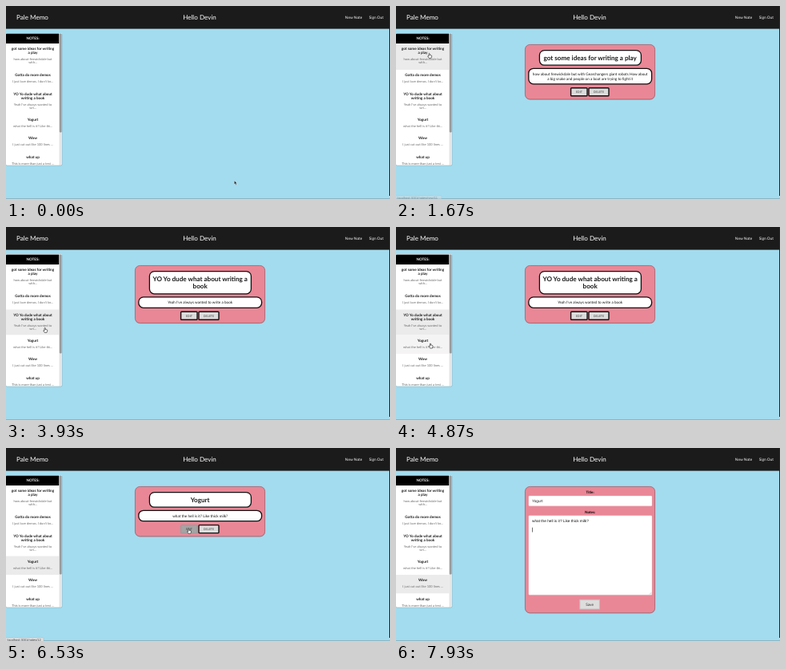
These frames come from a looping animation (480x242 px, 8000 ms). An HTML page:

```html
<!DOCTYPE html>
<html lang="en">
<head>
<meta charset="utf-8">
<title>Notes</title>
<style>
  html, body { margin: 0; width: 100%; height: 100%; overflow: hidden; background: #a3dcef; }
  svg { display: block; width: 100vw; height: 100vh; }
  text { font-family: Lato, "Open Sans", sans-serif; text-rendering: geometricPrecision; }
  .form-text { font-family: "Liberation Sans", Arial, sans-serif; }
</style>
</head>
<body>
<svg id="stage" viewBox="0 0 480 242"></svg>
<script>
const LOOP = 8000, FPS = 15;

const rect = (x, y, w, h, fill, more = "") =>
  `<rect x="${x}" y="${y}" width="${w}" height="${h}" fill="${fill}" ${more}/>`;
const text = (x, y, size, str, more = "") =>
  `<text x="${x}" y="${y}" font-size="${size}" ${more}>${str}</text>`;
const mid = (x, y, size, str, more = "") =>
  text(x, y, size, str, `text-anchor="middle" ${more}`);
const bold = 'font-weight="700"';
const group = (id, body, more = "") => `<g id="${id}" ${more}>${body}</g>`;

// Sidebar notes: top, height, title lines, preview lines
const notes = [
  [47, 33, ["got some ideas for writing", "a play"], ["how about fenwickdale but", "with..."]],
  [80, 23.5, ["Gotta do more demos"], ["I just love demos. I don't kn..."]],
  [103.5, 32, ["YO Yo dude what about", "writing a book"], ["Yeah I've always wanted to", "wri..."]],
  [135.5, 23.5, ["Yogurt"], ["what the hell is it? Like thi..."]],
  [159, 23.5, ["Wow"], ["I just cut out like 100 lines ..."]],
  [182.5, 23.5, ["what up"], ["This is more than just a test ..."]]
];

function noteItem([y, h, titles, previews], i) {
  const sub = y + 16.3 + (titles.length - 1) * 4.7;
  return rect(0, y, 66.5, h, "#fff", `id="item${i}"`) +
    titles.map((s, n) => mid(33.5, y + 8.4 + n * 4.6, 4.63, s, bold + ' fill="#1c1c1c"')).join("") +
    previews.map((s, n) => mid(33.5, sub + n * 4.1, 4.05, s, 'fill="#6c6c6c"')).join("");
}

const panel = h =>
  rect(161.4, 48.6, 162.4, h + .6, "#7d97a3", 'rx="6" opacity=".6"') +
  rect(161.4, 48.4, 162.2, h, "#e98796", 'rx="6" stroke="#a8606d" stroke-width=".8"');
const pill = (x, y, w, h) =>
  rect(x, y, w, h, "#fff", 'rx="6" stroke="#111" stroke-width="1.3"');

function button(x, y, w, label, edge, id = "") {
  return rect(x, y, w, 10, "#dcdcdc", `${id} rx=".8" stroke="${edge}" stroke-width="1.4"`) +
    mid(x + w / 2, y + 6.3, 3.75, label, 'fill="#444"');
}

// A card grows with its title and body line counts
function card(titles, lines, editEdge, id = "") {
  const th = 9 + titles.length * 9.6;
  const by = 55.6 + th + 4.1, bh = 7.3 + lines.length * 6.1;
  const y = by + bh + 4.9;
  return panel(y + 14.2 - 48.4) + pill(179.4, 55.6, 127, th) +
    titles.map((s, n) => mid(242.7, 67.7 + n * 9.6, 8.1, s, bold + ' fill="#1a1a1a"')).join("") +
    pill(165.8, by, 153.8, bh) +
    lines.map((s, n) => mid(242.7, by + 8.3 + n * 6.1, 4.65, s, 'fill="#111"')).join("") +
    button(218.6, y, 20.4, "EDIT", editEdge, id) + button(241, y, 25, "DELETE", "#111");
}

const cards = [
  card(["got some ideas for writing a play"],
    ["how about fenwickdale but with Gearchangers giant robots How about",
     "a big snake and people on a boat are trying to fight it"], "#111"),
  card(["Gotta do more demos"], ["I just love demos. I don't know the order"], "#111"),
  card(["YO Yo dude what about writing a", "book"], ["Yeah I've always wanted to write a book"], "#111"),
  card(["Yogurt"], ["what the hell is it? Like thick milk?"], "#c6c3c4", 'id="edit"')
];

const form = panel(158.4) +
  mid(242.6, 56.7, 4.5, "Title:", bold) +
  rect(165.8, 60, 154.2, 12.8, "#fff", 'rx="1" stroke="#d9c5c9" stroke-width=".4"') +
  text(170, 68.1, 4.73, "Yogurt", 'class="form-text" fill="#222"') +
  mid(242.6, 81.5, 4.5, "Notes:", bold) +
  rect(165.8, 84.8, 154.2, 99.4, "#fff", 'rx="1" stroke="#d9c5c9" stroke-width=".4"') +
  text(170, 92.9, 4.73, "what the hell is it? Like thick milk?", 'class="form-text" fill="#111"') +
  '<path d="M317 183.4l2.2-2.2M318.3 183.4l.9-.9" stroke="#888" stroke-width=".4"/>' +
  rect(229.8, 190.2, 24.6, 11.8, "#dedcdc", 'stroke="#c4bcbe" stroke-width="1"') +
  mid(242.1, 197.8, 4.8, "Save", 'fill="#333"') +
  rect(0, 0, .6, 5.8, "#111", 'id="caret"');

const arrow = '<path d="M0 0V4.6L1.1 3.7 1.9 5.4 2.7 5 1.9 3.4H3.3Z" fill="#111" stroke="#fff" stroke-width=".35"/>';
const hand = '<path d="M-.6.6Q0-.4.6.6V2.4L1.5 2.3 2.2 2.7 3 3V4.6L2.3 6.2H-.4L-2 3.9Q-2 3.1-.6 3.7Z" fill="#fff" stroke="#111" stroke-width=".6"/>';
const beam = '<path d="M-1-3Q0-3 0-2.4 0-3 1-3M0-2.4V2.4M-1 3Q0 3 0 2.4 0 3 1 3" fill="none" stroke="#222" stroke-width=".5"/>';

const stage = document.getElementById("stage");
stage.innerHTML =
  rect(0, 0, 480, 242, "#a3dcef") +
  rect(0, 0, 480, 28.6, "#1b1b1b") +
  rect(0, 241.2, 480, .8, "#87aab7") + rect(479, 0, 1, 238, "#1d282c") +
  text(13, 16.9, 8.1, "Pale Memo", 'fill="#fff"') +
  mid(242, 16.9, 8.1, "Hello Devin", 'fill="#fff"') +
  text(423.8, 15.6, 4.8, "New Note", 'fill="#fff"') +
  text(453.7, 15.6, 4.8, "Sign Out", 'fill="#fff"') +
  '<clipPath id="box"><rect y="34" width="70" height="165.6" rx="1.5"/></clipPath>' +
  rect(0, 34.2, 70.3, 166, "#7fa9b8", 'rx="1.5"') +
  group("list", rect(0, 34, 70, 166, "#fff") +
    notes.map(noteItem).join("") +
    rect(0, 34.6, 66.5, 12.4, "#000") +
    mid(33.5, 42.2, 4.6, "NOTES:", bold + ' fill="#fff"') +
    rect(66.5, 34, 3.5, 166, "#e6e6e6") + rect(66.8, 34.5, 2.9, 124, "#9b9b9b", 'rx="1"'),
    'clip-path="url(#box)"') +
  cards.map((c, i) => group("card" + i, c)).join("") +
  group("form", form) +
  group("status", rect(-1, 237.6, 58, 6, "#dcdfe1", 'id="bar" rx="1" stroke="#9fb4bd" stroke-width=".5"') +
    text(1.5, 241.8, 4, "", 'id="url" class="form-text" fill="#444"')) +
  group("cursor", group("arrow", arrow) + group("hand", hand) + group("beam", beam));

const $ = id => document.getElementById(id);
const show = (id, on) => { $(id).style.display = on ? "" : "none"; };

// Pointer path: tick, x, y
const path = [
  [2, 285.4, 219], [6, 251, 92.6], [9, 251, 92.6], [12, 115, 77.6], [14, 115, 77.6],
  [18, 40.6, 58.4], [20, 40.6, 58.4], [21, 41.6, 59.2], [27, 41.6, 59.2], [33, 32, 89],
  [43, 32, 89], [47, 30, 122.4], [55, 30, 122.4], [61, 58, 128], [67, 97, 146],
  [70, 97, 146], [73, 43, 145.8], [77, 34.4, 145], [85, 34.4, 145], [91, 120, 138],
  [98, 228.4, 101], [101, 228.4, 101], [108, 244, 91]
];
// Step tables: from tick, value
const scenes = [[0, -1], [25, 0], [37, 1], [50, 2], [79, 3], [99, 4]];
const links = [[0, ""], [25, "new/11"], [31, "new/10"], [45, "new/13"], [58, ""],
  [79, "new/12"], [88, ""], [96, "12"], [101, ""]];
const carets = [[0, null], [108, [241.2, 88.4]], [113, [170.2, 94]], [115, [170.2, 99.7]]];

const stepAt = (table, k) => table.filter(s => s[0] <= k).pop()[1];

function pointAt(k) {
  const n = path.findIndex(p => p[0] > k);
  if (n === 0) return path[0].slice(1);
  if (n < 0) return path[path.length - 1].slice(1);
  const [a, ax, ay] = path[n - 1], [b, bx, by] = path[n];
  const f = (k - a) / (b - a);
  return [ax + (bx - ax) * f, ay + (by - ay) * f];
}

function draw(t) {
  const k = Math.floor(t * FPS / 1000 + .1);
  const scene = stepAt(scenes, k), link = stepAt(links, k), caret = stepAt(carets, k);
  const [x, y] = pointAt(k);

  notes.forEach(([top, h], i) => {
    const over = x < 66 && y >= top && y < top + h && scene < 4;
    $("item" + i).setAttribute("fill", i === scene ? "#ebebeb" : over ? "#f5f4f4" : "#fff");
  });
  cards.forEach((c, i) => show("card" + i, i === scene));
  show("form", scene === 4);

  const onEdit = scene === 3 && x > 218 && y < 108;
  $("edit").setAttribute("fill", onEdit ? "#a5a3a4" : "#dcdcdc");
  $("edit").setAttribute("stroke", onEdit ? "#a09a9c" : "#c6c3c4");

  show("status", link);
  $("status").setAttribute("opacity", k === 25 ? .45 : 1);
  $("url").textContent = "localhost:3001/notes/" + link;
  $("bar").setAttribute("width", link.startsWith("new") ? 58 : 48);

  show("caret", caret);
  if (caret) {
    $("caret").setAttribute("x", caret[0]);
    $("caret").setAttribute("y", caret[1]);
  }

  const shape = scene === 4 ? "beam" : onEdit || (x < 66 && y > 47) ? "hand" : "arrow";
  ["arrow", "hand", "beam"].forEach(id => show(id, id === shape));
  show("cursor", k < 112);
  $("cursor").setAttribute("transform", `translate(${x} ${y})`);
}

const start = performance.now();
function tick() {
  draw((performance.now() - start) % LOOP);
  requestAnimationFrame(tick);
}
tick();
</script>
</body>
</html>
```
